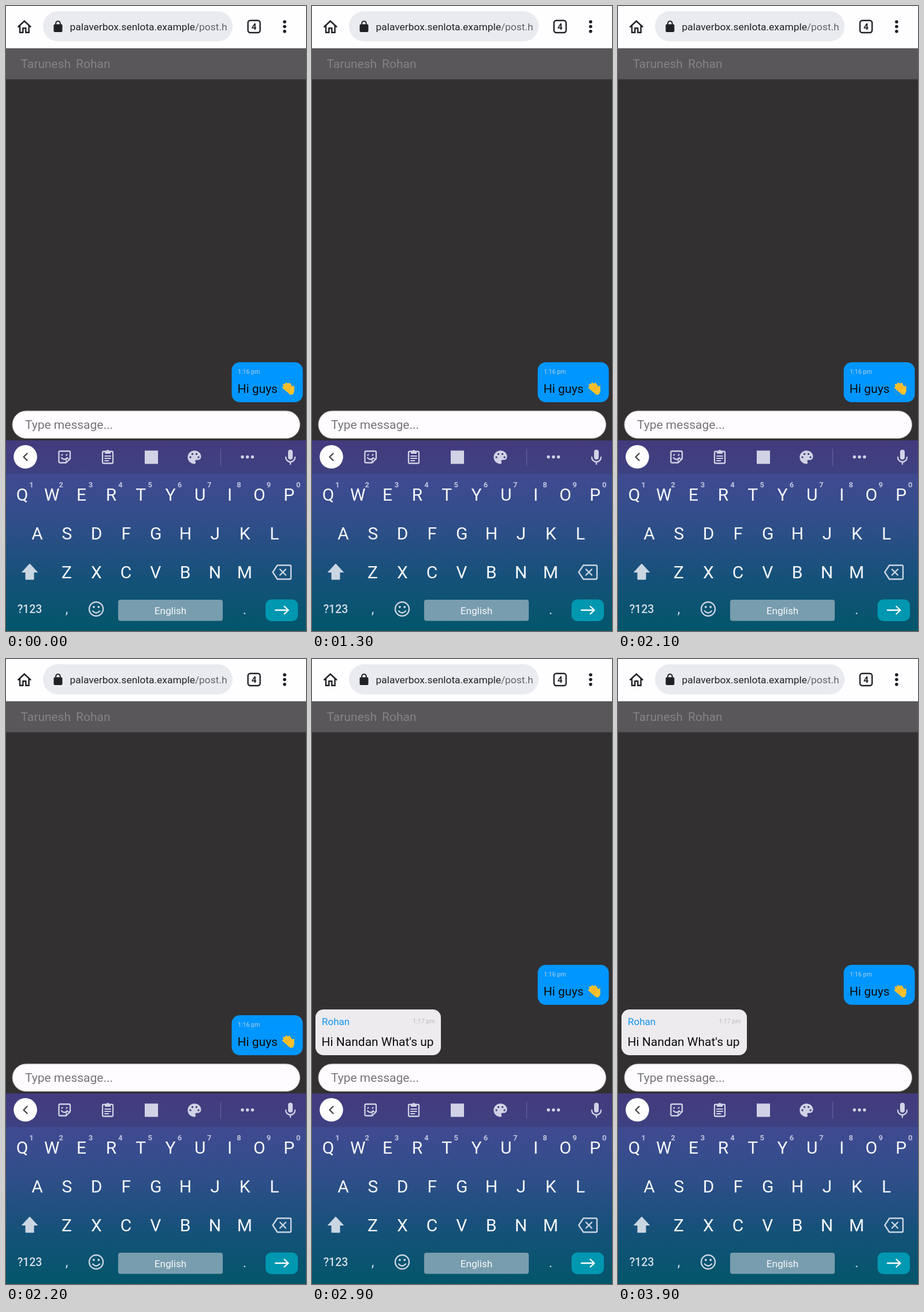
Animation, 519 px wide and 1079 px high, one loop 4000 ms. Source, as an HTML page:

```html
<!DOCTYPE html>
<html lang="en">
<head>
<meta charset="utf-8">
<title>Chat</title>
<style>
  html, body { margin: 0; width: 100%; height: 100%; overflow: hidden; background: #333032; }
  svg { display: block; font-family: Roboto, sans-serif; }
  text { white-space: pre; }
  .body { font-size: 21px; }
  .time { font-size: 10.6px; }
  .line { fill: none; stroke-linecap: round; stroke-linejoin: round; }
</style>
</head>
<body>
<svg width="519" height="1079" viewBox="0 0 519 1079">
  <defs>
    <linearGradient id="keysFill" x2="0" y2="1">
      <stop offset="0" stop-color="#404a91"/>
      <stop offset=".3" stop-color="#314e8a"/>
      <stop offset=".65" stop-color="#16517a"/>
      <stop offset="1" stop-color="#03566a"/>
    </linearGradient>
    <linearGradient id="toolsFill" x2="0" y2="1">
      <stop offset="0" stop-color="#433b7e"/>
      <stop offset="1" stop-color="#3e4181"/>
    </linearGradient>
    <clipPath id="addressClip"><path d="M100 10h282v50H100z"/></clipPath>
  </defs>

  <!-- Browser bar -->
  <rect width="519" height="73" fill="#fefdff"/>
  <rect x="64" y="9" width="328" height="52" rx="26" fill="#e9ebf0"/>
  <g class="line" stroke="#202124" stroke-width="2.4" style="stroke-linecap:butt;stroke-linejoin:miter">
    <path d="M20.5 36.5 31.8 26l11.3 10.5M24 33.5V45.8h5.3v-7.5h5v7.5h5.3V33.5"/>
    <rect x="418.6" y="25" width="21" height="21" rx="4"/>
    <path d="M86.2 33v-3a3.8 3.8 0 0 1 7.6 0v3" stroke-width="2"/>
  </g>
  <rect x="82.500" y="31.500" width="15" height="13.500" rx="2" fill="#202124"/>
  <g fill="#202124">
    <circle cx="482" cy="27.300" r="2.800"/>
    <circle cx="482" cy="35.500" r="2.800"/>
    <circle cx="482" cy="43.700" r="2.800"/>
    <text x="429" y="41" font-size="15" font-weight="700" text-anchor="middle">4</text>
    <text x="110.500" y="42" font-size="17.400" clip-path="url(#addressClip)">palaverbox.senlota.example<tspan fill="#5f6368">/post.html</tspan></text>
  </g>

  <!-- Chat -->
  <rect y="73" width="519" height="53.500" fill="#595759"/>
  <text class="body" x="25.500" y="106.500" fill="#858385">Tarunesh</text>
  <text class="body" x="121" y="106.500" fill="#858385">Rohan</text>

  <g id="sent">
    <rect x="390.500" y="615" width="123" height="69" rx="14" fill="#0096ff"/>
    <text class="time" x="401" y="635" fill="#b3d0e8">1:16 pm</text>
    <text class="body" x="400.500" y="668" fill="#0b0b0d">Hi guys</text>
    <g class="line" transform="translate(489 661)" stroke="#fcc22d" stroke-width="4">
      <path d="M-9-2.500 1 6M-8-7 4 4M-4-9 6 2M1-8.500 7 1" />
      <path d="M7.500 4 8-3.500" stroke-width="3.500"/>
      <path d="M0 4 5 0 8 3 6 8 3 8Z" fill="#fcc22d"/>
      <path d="M-6.500-2.500 0 3M-4.500-6 2 1M-.5-7 4-1" stroke="#e59a12" stroke-width=".8"/>
      <path d="M6-10q4 1 5 5M-10.500 4q1 4 5 5.500" stroke="#3b8fc0" stroke-width="1.300"/>
    </g>
  </g>
  <g id="reply">
    <rect x="6" y="605" width="217" height="79" rx="14" fill="#eeebef"/>
    <text x="17" y="631.500" font-size="17" fill="#1295e8">Rohan</text>
    <text class="time" x="212.500" y="629" text-anchor="end" fill="#bdbabd">1:17 pm</text>
    <text class="body" x="16.500" y="668" fill="#0b0b0d">Hi Nandan What's up</text>
  </g>

  <rect x="11" y="699" width="497.500" height="47.500" rx="23.700" fill="#fefcff" stroke="#a9a6a9"/>
  <text class="body" x="33" y="730" fill="#757375">Type message...</text>
  <rect id="caret" x="33" y="710" width="1.600" height="25" fill="#111"/>

  <!-- Keyboard toolbar -->
  <rect y="750" width="519" height="58" fill="url(#toolsFill)"/>
  <circle cx="33.500" cy="778.300" r="20.300" fill="#fff"/>
  <path class="line" d="M36.500 772.500l-6 6 6 6" stroke="#45454c" stroke-width="2.400"/>
  <g class="line" stroke="#d1d2e6" stroke-width="2.300">
    <path d="M93.500 768.500h15.500q2 0 2 2v11l-7 7H93.500q-2 0-2-2v-16q0-2 2-2z"/>
    <path d="M96 780q5 5.500 10 0M96.500 775.500l1-1M104.500 775.500l1-1"/>
    <path d="M111 781.500h-5q-2 0-2 2v5" stroke-width="1.600"/>
    <rect x="167" y="769" width="18" height="20.500" rx="2"/>
    <path d="M171 777h10M171 781h10M171 785h6.500" stroke-width="1.900"/>
    <path d="M484 779a8 8 0 0 0 16 0M492 787v4"/>
  </g>
  <g fill="#d1d2e6">
    <path d="M171 768h2.500a2.700 2.700 0 0 1 5 0h2.500v5h-10z"/>
    <rect x="240" y="767.500" width="23" height="23"/>
    <path d="M326 767.500c-6.500 0-11.700 5.200-11.700 11.500s5.200 11.500 11.700 11.500c2.300 0 2.700-2 1.700-3.400-1-1.600 0-3.300 1.800-3.300h2.500c3.300 0 5.500-2.600 5.500-6 0-5.800-5.200-10.300-11.500-10.300z"/>
    <circle cx="409" cy="778.500" r="2.700"/>
    <circle cx="417.700" cy="778.500" r="2.700"/>
    <circle cx="426.400" cy="778.500" r="2.700"/>
    <rect x="488" y="766" width="8" height="17" rx="4"/>
  </g>
  <g fill="#41407f">
    <circle cx="319" cy="779" r="1.700"/>
    <circle cx="322.500" cy="773.500" r="1.700"/>
    <circle cx="329.500" cy="773.500" r="1.700"/>
    <circle cx="333" cy="779" r="1.700"/>
  </g>
  <path d="M371.300 764.500v29" stroke="#6e6b9f"/>

  <!-- Keyboard -->
  <rect y="808" width="519" height="271" fill="url(#keysFill)"/>
  <g id="keys" fill="#f6f8fc" text-anchor="middle"></g>
  <path d="M41 963 27.500 977.500H34V990H48V977.500h6.500z" fill="#cbd6e3" stroke="#cbd6e3" stroke-linejoin="round"/>
  <g class="line" stroke="#cbd6e3" stroke-width="2.400">
    <path d="M469.500 965.500H491q2 0 2 2v20q0 2-2 2H469.500L461.500 977.500zM474 972.500l10 10M484 972.500l-10 10"/>
    <circle cx="156" cy="1041" r="12"/>
    <path d="M150 1044.500q6 6.500 12 0"/>
  </g>
  <circle cx="151.800" cy="1037.500" r="1.900" fill="#cbd6e3"/>
  <circle cx="160.200" cy="1037.500" r="1.900" fill="#cbd6e3"/>
  <rect x="194" y="1025" width="181" height="36.500" rx="4" fill="#789dae"/>
  <text x="284.500" y="1049.500" font-size="17.200" fill="#f6f8fc" text-anchor="middle">English</text>
  <g fill="#d3dee8">
    <text x="41" y="1048" font-size="19.500" font-weight="500" text-anchor="middle">?123</text>
    <text x="105" y="1049" font-size="24" text-anchor="middle">,</text>
    <text x="413" y="1050" font-size="24" text-anchor="middle">.</text>
  </g>
  <rect x="449" y="1024.500" width="56" height="37.500" rx="10" fill="#0097b0"/>
  <path class="line" d="M466 1043h22M481.500 1036.500l7 6.500-7 6.500" stroke="#fff" stroke-width="2.300"/>
</svg>
<script>
  const LOOP = 4000, REPLY_AT = 2300, REPLY_SHIFT = -87;
  const find = id => document.getElementById(id);
  const sent = find('sent'), reply = find('reply'), caret = find('caret');

  const glyph = (x, y, size, char, extra = '') =>
    `<text x="${x}" y="${y}" font-size="${size}" ${extra}>${char}</text>`;
  const keyRow = (chars, x, y, size, extra) =>
    [...chars].map((char, i) => glyph(x + i * 51.3, y, size, char, extra)).join('');

  find('keys').innerHTML =
    keyRow('QWERTYUIOP', 28, 854, 30) +
    keyRow('1234567890', 44, 830.5, 13, 'font-weight="700" fill="#bfc4df"') +
    keyRow('ASDFGHJKL', 54, 921, 30) +
    keyRow('ZXCVBNM', 105, 987.5, 30);

  const show = (node, visible) => node.setAttribute('visibility', visible ? 'visible' : 'hidden');

  function draw() {
    const t = performance.now() % LOOP;
    const blink = t % 1000;
    const replied = t >= REPLY_AT;
    show(caret, blink >= 400 && blink < 900);
    show(reply, replied);
    sent.setAttribute('transform', `translate(0 ${replied ? REPLY_SHIFT : 0})`);
    requestAnimationFrame(draw);
  }
  draw();
</script>
</body>
</html>
```
